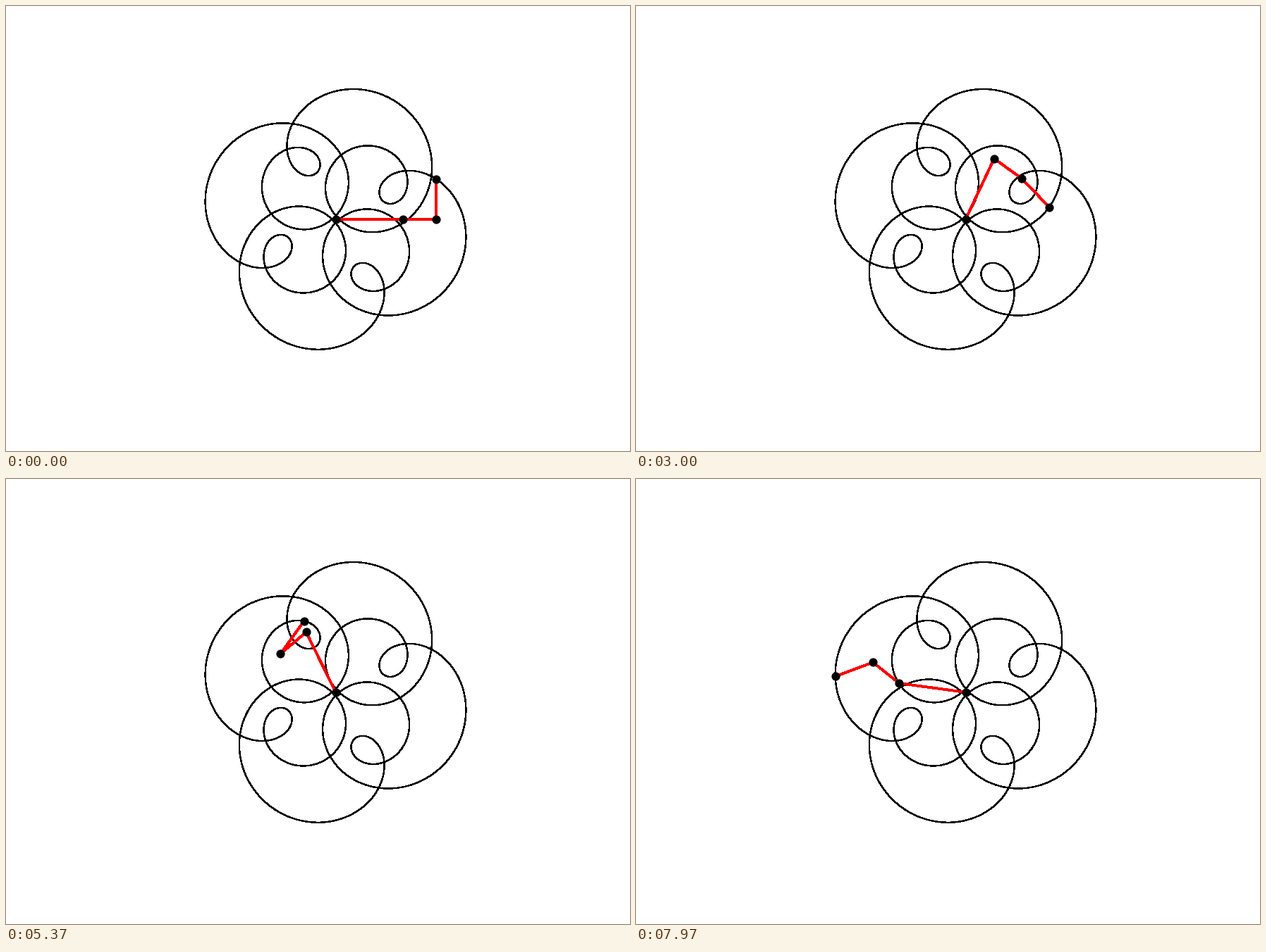
Write a matplotlib script that moves like this. It is 885 px wide and 632 px high and loops after 8000 ms.

```python
import numpy as np
import matplotlib.pyplot as plt
from matplotlib.animation import FuncAnimation

W, H, DPI = 885, 632, 100
FRAMES, LOOP_MS = 240, 8000
STEP = np.radians(0.7208)      # turn of the first arm per frame
UNIT = 95.1                    # length of the first arm in pixels
ORIGIN = 467.5 + (H - 302.9) * 1j
PT = 72 / DPI                  # points per pixel

# (complex length, turning speed) of each arm
ARMS = [(1, 1), (0.5, 5), (0.6j, 9)]


def joints(t):
    """Positions of the pivot, both joints and the pen at angle t."""
    points = [ORIGIN + 0 * t]
    for size, speed in ARMS:
        points.append(points[-1] + UNIT * size * np.exp(1j * speed * t))
    return np.array(points)


fig = plt.figure(figsize=(W / DPI, H / DPI), dpi=DPI, facecolor="white")
ax = fig.add_axes([0, 0, 1, 1])
ax.set_xlim(0, W)
ax.set_ylim(0, H)
ax.axis("off")

# Hard-edged strokes fill every touched pixel, so widths are kept slim.
style = dict(antialiased=False, snap=False)
curve = joints(np.linspace(0, 2 * np.pi, 1000))[-1]
ax.plot(curve.real, curve.imag, color="black", lw=1.4 * PT, zorder=1, **style)
rods, = ax.plot([], [], color="red", lw=2.9 * PT, zorder=2,
                solid_joinstyle="round", solid_capstyle="butt", **style)
dots, = ax.plot([], [], "o", color="black", ms=12.2 * PT, mew=0, zorder=3,
                **style)


def update(frame):
    points = joints(frame * STEP)
    for line in (rods, dots):
        line.set_data(points.real, points.imag)
    return rods, dots


def reset():
    return update(0)


anim = FuncAnimation(fig, update, frames=FRAMES, init_func=reset,
                     interval=LOOP_MS / FRAMES, repeat=True, repeat_delay=0)
plt.show()
```
